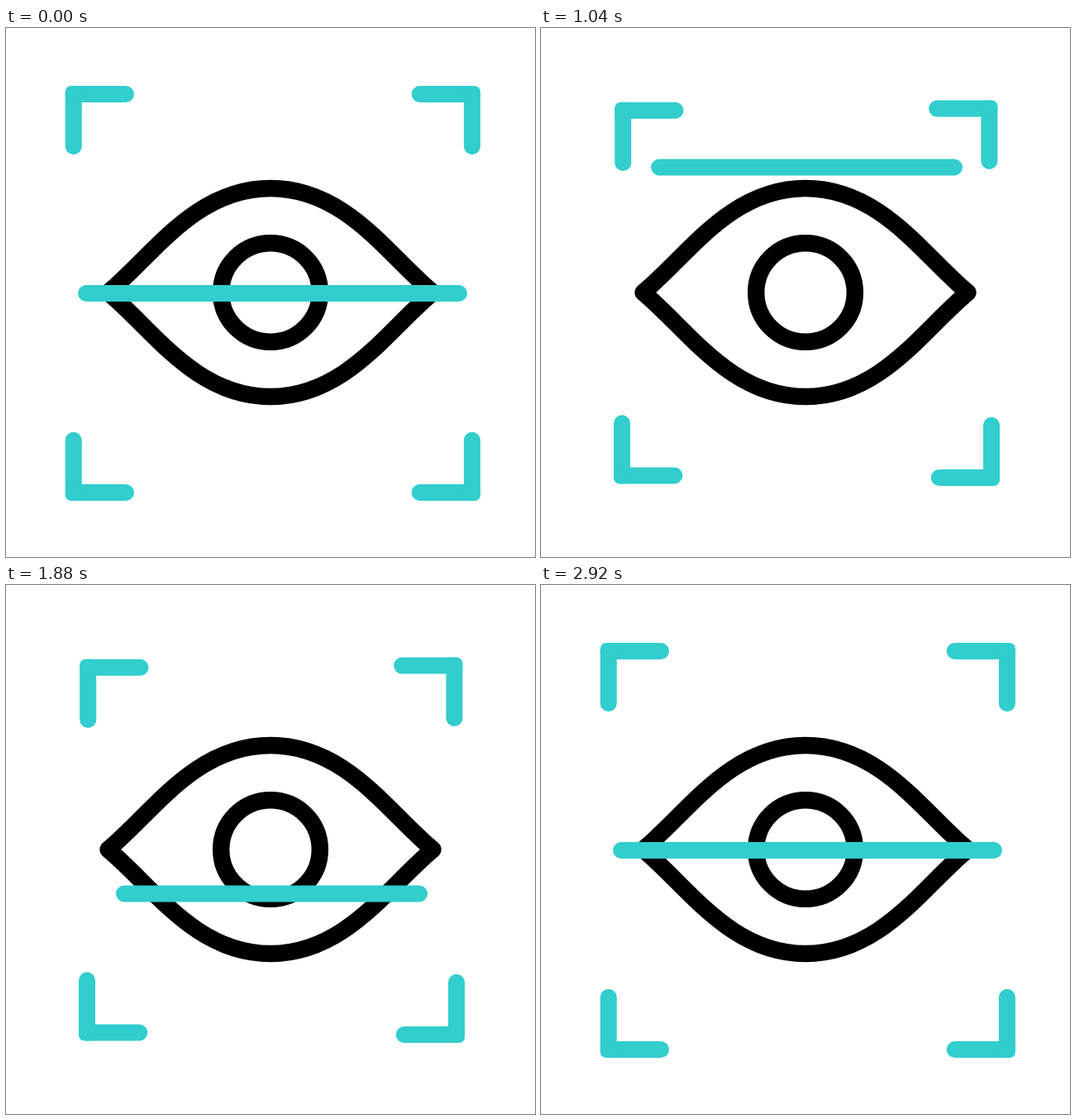
An HTML page with a canvas that plays this animation: 640 px wide and 640 px high, repeating every 3 s.

```html
<!DOCTYPE html>
<html lang="en">
<head>
<meta charset="utf-8">
<title>Eye scan</title>
<style>
  html, body { margin: 0; width: 100%; height: 100%; overflow: hidden; background: #fff; }
  canvas { display: block; width: 640px; height: 640px; }
</style>
</head>
<body>
<canvas width="640" height="640"></canvas>
<script>
const ctx = document.querySelector('canvas').getContext('2d');
const TEAL = '#32cdcd', FPS = 24, STEPS = 72, MID = 320;

const mix = (a, b, p) => a + (b - a) * p;
const clamp = (v, min, max) => Math.min(max, Math.max(min, v));

// Eased 0 to 1 between steps a and b
function ramp(n, a, b) {
  const p = clamp((n - a) / (b - a), 0, 1);
  return p < .5 ? .5 * (2 * p) ** 3.5 : 1 - .5 * (2 - 2 * p) ** 3.5;
}

// Half the eye outline; side is -1 for the upper lid, 1 for the lower
function lid(path, side, shut) {
  const x1 = mix(178, 196, shut), y1 = mix(MID + side * 45, 378, shut);
  const x2 = mix(229, 228, shut), y2 = mix(MID + side * 126, 390.6 + side * 1.2, shut);
  const near = [x1, y1, x2, y2, MID, y2];
  const far = [640 - x2, y2, 640 - x1, y1, 516.5, MID];
  if (side < 0) {
    path.bezierCurveTo(...near);
    path.bezierCurveTo(...far);
  } else {
    path.bezierCurveTo(640 - x1, y1, 640 - x2, y2, MID, y2);
    path.bezierCurveTo(x2, y2, x1, y1, 123.5, MID);
  }
}

function drawEye(n) {
  const shut = ramp(n, 1, 8) - ramp(n, 11, 18) + ramp(n, 50, 57) - ramp(n, 63, 70);
  const eye = new Path2D();
  eye.moveTo(123.5, MID);
  lid(eye, -1, shut);
  lid(eye, 1, shut);
  eye.closePath();

  // The iris shows only between the lids
  ctx.save();
  ctx.clip(eye);
  ctx.beginPath();
  ctx.arc(MID, MID, 59.8, 0, 2 * Math.PI);
  ctx.stroke();
  ctx.restore();
  ctx.stroke(eye);
}

// Rises to the top, scans down at constant speed, returns to the middle
function drawBar(n) {
  const away = ramp(n, 14, 20) - ramp(n, 60, 70);
  const scan = 158.2 + 10.25 * clamp(n - 24, 0, 32);
  const y = mix(321, scan, away);
  ctx.beginPath();
  ctx.moveTo(mix(97, 143, away), y);
  ctx.lineTo(mix(548, 500, away), y);
  ctx.stroke();
}

// dx, dy point along the arms; inner is the corner when pulled in
function drawBracket(n, dx, dy, innerX, innerY) {
  const inward = ramp(n, 1, 11) - ramp(n, 60, 70);
  const x = mix(322.8 - dx * 241.1, innerX, inward);
  const y = mix(321 - dy * 241, innerY, inward);
  ctx.beginPath();
  ctx.moveTo(x + dx * 63.3, y);
  ctx.lineTo(x, y);
  ctx.lineTo(x, y + dy * 63.3);
  ctx.stroke();
  ctx.beginPath();
  ctx.roundRect(x - 10, y - 10, 20, 20, 7);
  ctx.fill();
}

function draw(now) {
  const n = Math.floor((now + 5) / 1000 * FPS) % STEPS;
  ctx.clearRect(0, 0, 640, 640);
  ctx.lineCap = ctx.lineJoin = 'round';

  ctx.lineWidth = 20.5;
  ctx.strokeStyle = '#000';
  drawEye(n);

  ctx.lineWidth = 20;
  ctx.strokeStyle = ctx.fillStyle = TEAL;
  drawBar(n);
  drawBracket(n, 1, 1, 99.2, 99.7);
  drawBracket(n, -1, 1, 542.4, 97.6);
  drawBracket(n, 1, -1, 98, 541.5);
  drawBracket(n, -1, -1, 545, 544);
}

function loop() {
  draw(performance.now());
  requestAnimationFrame(loop);
}
loop();
</script>
</body>
</html>
```
